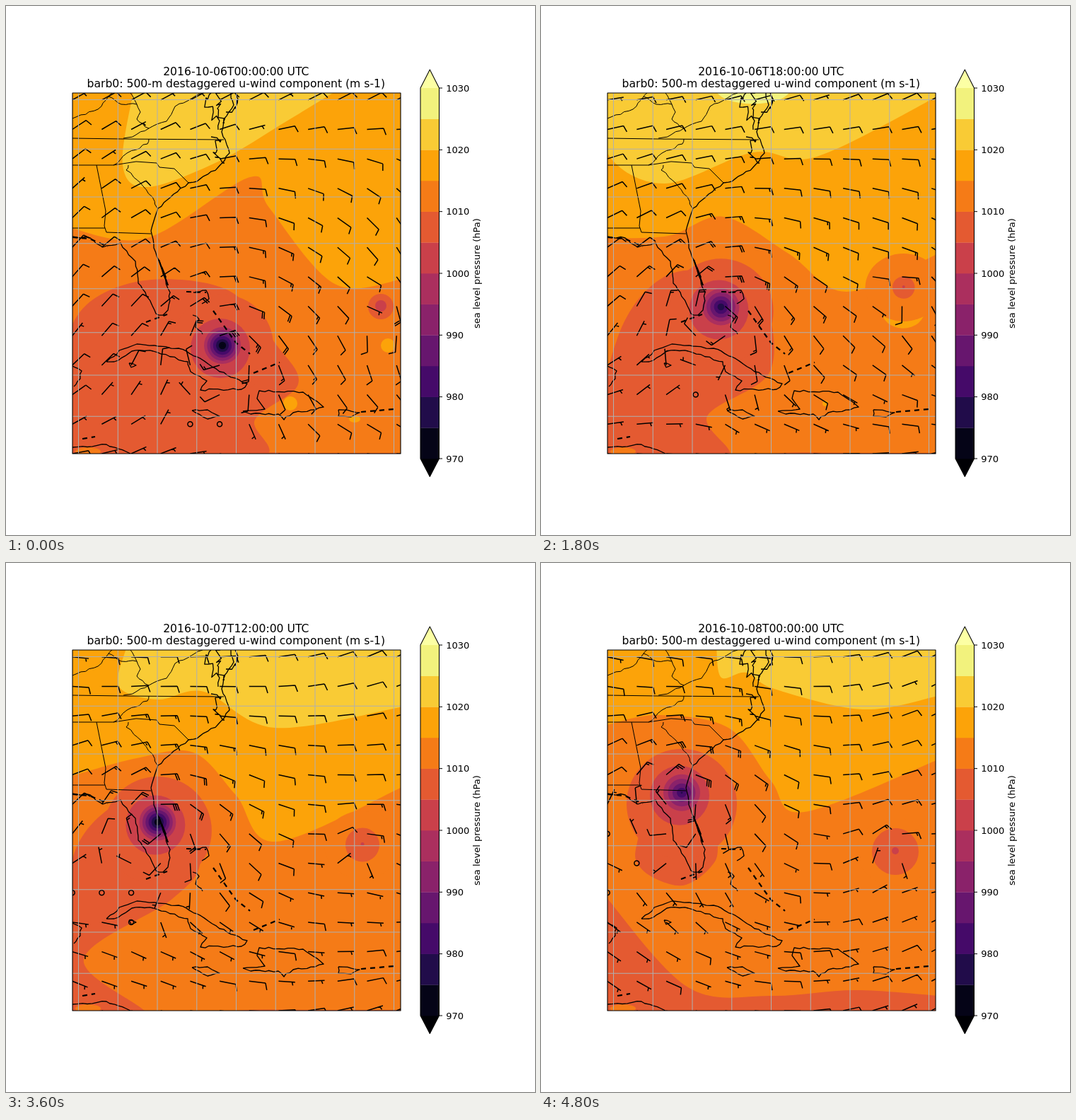
Write an HTML page that moves like this. It is 748x748 px and loops after 5.1 s.

```html
<!DOCTYPE html>
<html lang="en">
<head>
<meta charset="utf-8">
<title>Sea level pressure and wind</title>
<style>
  html, body { margin: 0; width: 100%; height: 100%; overflow: hidden; background: #fff; }
  svg { display: block; width: 100vw; height: 100vh; }
  text { font-family: "DejaVu Sans", sans-serif; font-size: 13px; }
  .title { font-size: 15.62px; text-anchor: middle; }
  .line { fill: none; stroke: #000; stroke-linejoin: round; }
</style>
</head>
<body>
<svg viewBox="0 0 748 748">
  <clipPath id="frame"><path d="M94 123H558V633H94Z"/></clipPath>
  <text id="date" class="title" x="325.3" y="98"></text>
  <text class="title" x="325.3" y="115">barb0: 500-m destaggered u-wind component (m s-1)</text>
  <g clip-path="url(#frame)">
    <path d="M94 123H558V633H94Z" fill="#f57b17"/>
    <g id="field"></g>
    <path id="borders" class="line"/>
    <path id="coast" class="line" stroke-width="1.3"/>
    <path class="line" stroke-width="2.2" d="M216 359L229 395M220 369L226 384"/>
    <path class="line" stroke-width="2.2" stroke-dasharray="7 6" d="M94 327L118 329L144 340M198 447L228 436M255 404L283 405M293 431L325 476L345 492M350 519L387 504M502 574L549 570M108 612L126 609"/>
    <path id="barbs" class="line" stroke-width="1.5"/>
    <path id="grid" stroke="#b0b0b0" stroke-width="1.04"/>
  </g>
  <path class="line" stroke-width="1.1" d="M94 123H558V633H94Z"/>
  <g id="scale"></g>
  <text text-anchor="middle" transform="translate(670 378) rotate(-90)">sea level pressure (hPa)</text>
</svg>
<script>
const STEP = 300, STEPS = 17, LAST = STEPS - 1;
const COLORS = ['#050417', '#210c4a', '#450a69', '#67166e', '#8a226a', '#ab2f5e',
  '#ca404a', '#e45a31', '#f57b17', '#fca309', '#f9cb35', '#f2f27d'];
const [CRIMSON, RED, ORANGE, AMBER, YELLOW, PALE] = COLORS.slice(6);

// Outlines as key points; roughen() adds the small bays between them.
const COAST = [
  '318,123 322,140 308,160 305,178 316,208 300,228 270,248 258,250 232,271 215,286 205,318',
  '205,318 209,342 232,405 229,430 222,437 212,435 197,405 187,392 183,361 162,335 137,341 119,328 94,326',
  '142,503 160,487 185,478 215,481 244,484 270,496 302,517 341,534 333,542 275,543 284,530 261,517 257,503 208,488 178,488 153,503 142,503',
  '335,573 366,570 355,555 358,544 420,546 449,567 437,571 406,575 393,585 385,577 346,577 335,573',
  '263,572 285,571 302,580 285,584 263,572', '470,571 500,575 488,581 470,580 470,571',
  '265,405 283,402 287,414 277,421', '264,437 273,443 268,454 278,464', '174,505 184,508 177,511 174,505',
  '94,509 107,516 105,527 96,538', '94,624 142,620 176,633',
];
const BAYS = ['290,123 286,143 300,175', '303,123 299,145 309,165', '324,123 324,145 311,150', '290,185 304,190 293,207 309,222'];
const BORDERS = [
  '94,159 130,146 145,128 163,139 185,139 190,150 185,160 202,173 227,163 239,142 278,123',
  '152,225 171,208 200,195 202,188', '202,173 184,182 166,187', '145,128 150,123', '185,139 176,123',
  '173,225 170,232 190,250 207,270 214,286',
];
const STRAIGHT = 'M94 187L165 188L308 189M94 225H152L184 220L213 222L217 228L238 230L258 250M128 225L141 290L139 311L142 320L205 322M94 314H140';

// Isobars and lows as a few points that glide between times: [step, ...values].
const TRACKS = {
  high: [
    [0, 180,120, 165,225, 200,256, 300,220, 390,167, 467,120],
    [6, 90,120, 95,210, 175,251, 300,207, 390,213, 562,127],
    [12, 170,120, 160,175, 215,193, 280,182, 380,233, 562,203],
    [16, 248,120, 255,162, 290,155, 330,178, 455,207, 562,188]],
  middle: [
    [0, 90,314, 200,328, 345,242, 372,285, 465,393, 562,386],
    [6, 90,328, 180,325, 258,298, 350,350, 432,404, 562,350],
    [12, 90,302, 185,276, 265,268, 325,328, 382,394, 562,316],
    [16, 90,230, 165,215, 265,233, 325,308, 372,352, 562,278]],
  tail: [
    [0, 90,460, 175,392, 310,400, 383,480, 413,535, 352,585, 356,640, 90,640],
    [6, 108,470, 180,380, 290,385, 322,430, 322,520, 235,580, 262,640, 90,640],
    [12, 92,425, 165,335, 250,330, 275,420, 235,475, 110,560, 200,640, 90,640],
    [14, 135,400, 165,325, 240,320, 250,400, 240,430, 205,455, 170,450, 140,430]],
  south: [[12, 660, 650, 633, 632, 632], [14, 660, 640, 626, 600, 580], [16, 470, 600, 612, 604, 612]],
  pale: [[0, 300, 0], [6, 300, 52], [8, 340, 88], [11, 340, 0]],
  depth: [[0, 6.5], [2, 4.3], [12, 6.3], [16, 4.3]],
  low: [[0, 530, 425, 18, 8], [8, 507, 389, 15, 0], [16, 501, 408, 33, 5]],
};

const el = id => document.getElementById(id);
const lerp = (a, b, f) => a + (b - a) * f;
const pairs = list => list.flatMap((v, i) => i % 2 ? [] : [[v, list[i + 1]]]);

function track(name, k) {
  const keys = TRACKS[name];
  const i = Math.max(1, keys.findIndex(key => key[0] >= k));
  const end = k > keys.at(-1)[0] ? keys.length - 1 : i;
  const [a, b] = [keys[end - 1], keys[end]];
  const f = Math.min(1, Math.max(0, (k - a[0]) / (b[0] - a[0])));
  return a.slice(1).map((v, j) => lerp(v, b[j + 1], f));
}

let seed = 7;
const random = () => (seed = seed * 16807 % 2147483647) / 2147483647;

function roughen(outline, size, pitch = 7) {
  const points = outline.split(' ').map(p => p.split(',').map(Number));
  const jitter = () => (random() - .5) * 2 * size;
  return points.map(([x, y], i) => {
    if (!i) return `M${x} ${y}`;
    const [px, py] = points[i - 1], n = Math.ceil(Math.hypot(x - px, y - py) / pitch);
    let d = '';
    for (let j = 1; j < n; j++) d += `L${lerp(px, x, j / n) + jitter()} ${lerp(py, y, j / n) + jitter()}`;
    return d + `L${x} ${y}`;
  }).join('');
}

function curve(points, closed) {
  const n = points.length;
  const at = i => points[closed ? (i + n) % n : Math.min(n - 1, Math.max(0, i))];
  let d = 'M' + points[0];
  for (let i = 0; i < (closed ? n : n - 1); i++) {
    const [a, b, c, e] = [at(i - 1), at(i), at(i + 1), at(i + 2)];
    const lead = [0, 1].map(j => b[j] + (c[j] - a[j]) / 6);
    const trail = [0, 1].map(j => c[j] - (e[j] - b[j]) / 6);
    d += `C${lead} ${trail} ${c}`;
  }
  return d;
}

const area = (d, fill) => `<path d="${d}" fill="${fill}"/>`;
const oval = (x, y, rx, ry, fill) => rx > .5
  ? `<ellipse cx="${x}" cy="${y}" rx="${rx}" ry="${ry}" fill="${fill}"/>` : '';

// The cyclone drifts north-west and slows its westward course.
const eyeAt = k => [199 + 107 * (1 - k / LAST) ** 1.4, 480 - 9.7 * k + 4 * Math.sin(Math.PI * k / LAST)];

function drawField(k, [x, y], [lx, ly, size, core]) {
  const above = list => curve(pairs(list)) + `V100H${list[0]}Z`;
  const south = track('south', k).map((v, i) => [90 + i * 118, v]);
  const [px, width] = track('pale', k), [depth] = track('depth', k);
  const halo = Math.min(48, 20 + 5 * k), gulf = Math.max(0, 1 - Math.abs(k - 8) / 3);
  const reach = lerp(72, 78, k / LAST), spot = Math.max(0, 10 - k), early = Math.max(0, 10 - 6 * k);
  let svg = area(above(track('middle', k)), AMBER) + oval(512, 430, 92 * gulf, 77 * gulf, AMBER) +
    area(above(track('high', k)), YELLOW) + oval(px, 118, width, 10 + width * .2, PALE) +
    area(curve(pairs(track('tail', k)), true), RED) + oval(x, y + k, reach, reach, RED) +
    area(curve(south) + 'V660H90Z', RED) +
    oval(lx, ly, halo * 1.13, halo, ORANGE) + oval(lx, ly, size, size, RED) + oval(lx, ly - 1, core, core, CRIMSON) +
    oval(402, 562, spot, spot, AMBER) + oval(540, 480, early, early, AMBER) + oval(493, 584, early * .8, early * .5, AMBER) +
    oval(116, 630, 18, 6, ORANGE) + oval(x - 3, y + 4, 42, 42, CRIMSON);
  for (let i = 0; i < depth; i++) {
    const r = 26 * (1 - i / depth) ** 1.1;
    svg += oval(x, y, r, r, COLORS[Math.max(0, 5 - i)]);
  }
  el('field').innerHTML = svg;
}

// Steady wind: south-easterlies in the east at first, easterlies spreading later.
function steadyWind(x, y, k) {
  const u = (x - 94) / 464, v = (y - 133) / 500;
  const early = -28 + (120 * u - 25) * Math.sin(Math.PI * v) + 25 * v;
  const late = 30 - 60 * u;
  const angle = lerp(early, late, k / LAST) * Math.PI / 180;
  const speed = 7.5 + u + 1.5 * Math.sin(x * .041 + y * .055);
  return [speed * Math.cos(angle), speed * Math.sin(angle)];
}

function swirl(x, y, [cx, cy], peak, reach) {
  const dx = x - cx, dy = y - cy, r = Math.hypot(dx, dy) || 1;
  const speed = peak * Math.exp(-r / reach) * Math.min(1, r / 15) / r;
  return [speed * (.25 * dx - dy), speed * (.25 * dy + dx)];
}

function barb(x, y, wx, wy) {
  const speed = Math.hypot(wx, wy), count = Math.round(speed / 5);
  if (!count) return `M${x - 3.5} ${y}a3.5 3.5 0 1 0 7 0a3.5 3.5 0 1 0 -7 0`;
  const ux = wx / speed, uy = wy / speed;
  const point = (along, side) => `${x + ux * along - uy * side} ${y + uy * along + ux * side}`;
  let d = `M${x} ${y}L${point(23.4, 0)}`, reach = 23.4;
  for (let n = count; n > 1; n -= 2, reach -= 2.92) d += `M${point(reach, 0)}L${point(reach + 2.9, 9.4)}`;
  if (count === 1) reach -= 4.4;
  if (count % 2) d += `M${point(reach, 0)}L${point(reach + 1.5, 4.7)}`;
  return d;
}

function drawBarbs(k, eye, low) {
  let d = '';
  for (let j = 0; j < 13; j++) for (let i = 0; i < 12; i++) {
    const x = 93.7 + i * 41.68, y = 132.8 + j * 41.68;
    const winds = [steadyWind(x, y, k), swirl(x, y, eye, 30, 85), swirl(x, y, low, 14, 45)];
    d += barb(x, y, ...[0, 1].map(axis => winds.reduce((sum, w) => sum + w[axis], 0)));
  }
  el('barbs').setAttribute('d', d);
}

function drawFixed() {
  el('coast').setAttribute('d', COAST.map(o => roughen(o, 1.3)).join('') + BAYS.map(o => roughen(o, 6, 5)).join(''));
  el('borders').setAttribute('d', STRAIGHT + BORDERS.map(o => roughen(o, 1.5)).join(''));

  let grid = '';
  for (let i = 0; i < 9; i++) grid += `M${102.5 + i * 55.75} 123V633`;
  for (let i = 0; i < 8; i++) grid += `M94 ${132.5 + 70.6 * i - .95 * i * i}H558`;
  el('grid').setAttribute('d', grid);

  const band = 524 / 12;
  let scale = area('M586 116L599.3 90L612.5 116Z', '#fcffa4') + area('M586 640L599.3 665.5L612.5 640Z', '#000004');
  COLORS.forEach((c, i) => {
    scale += `<rect x="586" y="${640 - (i + 1) * band}" width="26.5" height="${band + .3}" fill="${c}"/>`;
  });
  for (let i = 0; i < 7; i++) {
    const y = 640 - i * band * 2;
    scale += `<path class="line" d="M612.5 ${y}h4.5"/><text x="622.3" y="${y + 4.8}">${970 + i * 10}</text>`;
  }
  el('scale').innerHTML = scale + '<path class="line" stroke-width="1.04" d="M586 116L599.3 90L612.5 116V640L599.3 665.5L586 640Z"/>';
}

function draw(k) {
  const eye = eyeAt(k), low = track('low', k);
  el('date').textContent = new Date(Date.UTC(2016, 9, 6, 3 * k)).toISOString().slice(0, 19) + ' UTC';
  drawField(k, eye, low);
  drawBarbs(k, eye, low);
}

let start, shown = -1;
function tick(now) {
  start ??= now;
  const k = Math.floor((now - start) / STEP) % STEPS;
  if (k !== shown) draw(shown = k);
  requestAnimationFrame(tick);
}

drawFixed();
draw(0);
requestAnimationFrame(tick);
</script>
</body>
</html>
```
